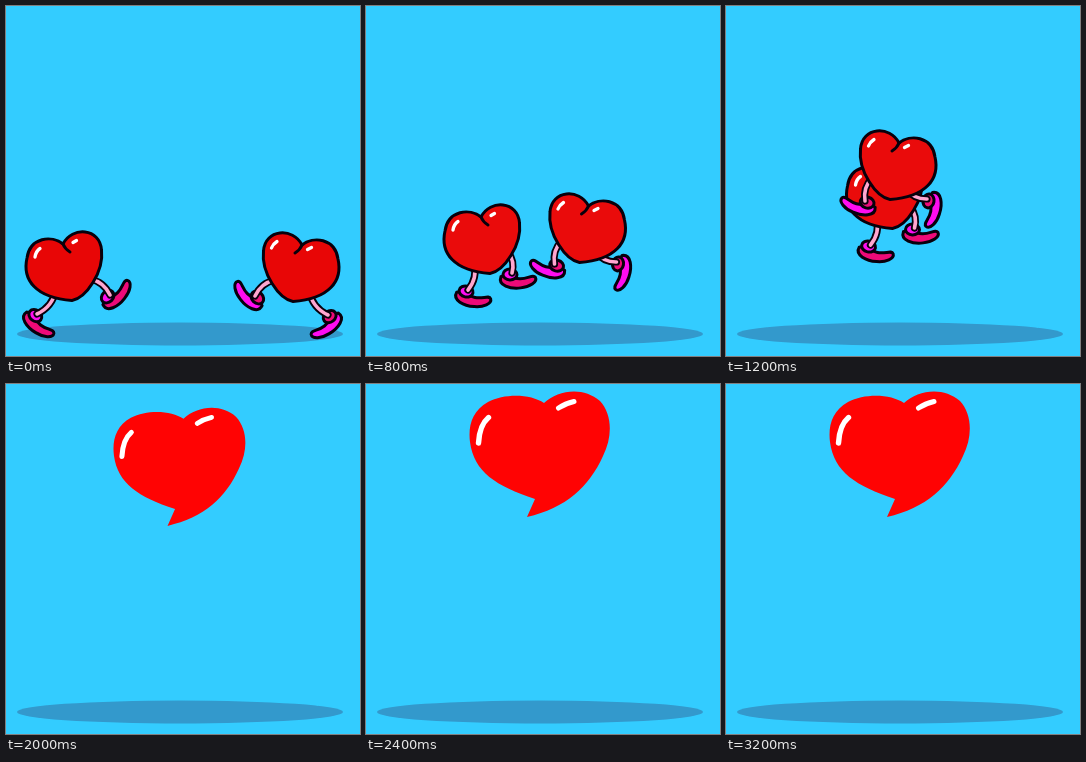
Recreate the animation shown at these times as an HTML page. Size 354 px wide and 350 px high, loop 3600 ms.

```html
<!DOCTYPE html>
<html lang="en">
<head>
<meta charset="utf-8">
<title>Two hearts become one</title>
<style>
html, body { margin: 0; width: 100%; height: 100%; overflow: hidden; background: #33ccff; }
svg { display: block; width: 354px; height: 350px; }
path, ellipse { stroke-linejoin: round; stroke-linecap: round; }
.line { stroke: #08000c; stroke-width: 3; }
.shine { stroke: #fff; }
</style>
</head>
<body>
<svg id="stage" viewBox="0 0 354 350">
  <ellipse cx="174" cy="328" rx="163" ry="11.5" fill="#3399cc"/>
</svg>
<script>
const STEP = 400, STEPS = 9, WALK_STEPS = 4, RISE_STEPS = 2;
const CRIMSON = '#ee0a78', MAGENTA = '#ff0cf0', PINK = '#ffa6cf', INK = '#08000c';
const REDS = ['#e80606', '#da0505', '#ea0b0b'];
const stage = document.getElementById('stage');

const BODY = 'M57 238C46 229 24 231 21 252C16 274 30 292 66 294.5C80 292 98 266 95.5 244C94 222 66 220 57 238Z';
const CREASE = 'M57 238Q59 243 64 246';
const SHOE = 'M-9 2C-12 11 1 14 11 12.5C20 11.5 28 6 25.5 1.5C23 -2 18 3.5 10 3.5C4 3.5 -4 -1 -9 2Z';
const BIG = 'M178 19C165 10 139 9 122 18C106 27 102 42 104 58C108 88 130 102 169 115L161 133' +
  'C200 124 223 103 237 72C247 52 246 30 234 17C217 2 192 6 178 19Z';

const HIPS = { back: [50, 284], front: [84, 273] };

// Each foot: x, y and tilt, beside a heart that faces right
const STRIDE = { back: [29, 310, 39], front: [102, 291, -44] };
const PLANT = { back: [42, 313, 12], front: [86, 296, 2] };
const KICK = { back: [27, 296, 80], front: [89, 298, -15] };

// The hearts start with a run and accelerate into the leap
const LEFT = {
  step: PLANT, shoe: CRIMSON, cuff: MAGENTA, frame: '',
  path: t => [20 * t + 4.5 * t * t, 7.5 * t - 10.5 * t * t],
  shines: ['M29 251Q30 245 34 242.5', 'M67 236.5L70.5 234.5']
};
const RIGHT = {
  step: KICK, shoe: MAGENTA, cuff: CRIMSON, frame: 'translate(353 1) scale(-1 1)',
  path: t => [28.25 * t + 4.25 * t * t, 9.5 * t - 14.5 * t * t],
  shines: ['M87.5 241Q86 237 82 234.5', 'M51.5 242.5L47.5 240.5']
};

function add(parent, tag, attrs) {
  const el = document.createElementNS('http://www.w3.org/2000/svg', tag);
  for (const k in attrs) el.setAttribute(k, attrs[k]);
  return parent.appendChild(el);
}

function stroke(parent, d, width, color) {
  add(parent, 'path', { d, fill: 'none', stroke: color, 'stroke-width': width });
}

function leg(parent, [hx, hy], [fx, fy, tilt], { shoe, cuff }) {
  const foot = add(parent, 'g', { transform: `translate(${fx} ${fy}) rotate(${tilt})` });
  add(foot, 'path', { d: SHOE, class: 'line', fill: shoe });
  add(foot, 'ellipse', { cy: -0.5, rx: 7, ry: 5.5, class: 'line', fill: cuff });

  // The knee bends to the side of the line from hip to ankle
  const ax = fx + 2, ay = fy - 2, dx = ax - hx, dy = ay - hy;
  const d = `M${hx} ${hy}Q${hx + dx / 2 + dy / 4} ${hy + dy / 2 - dx / 4} ${ax} ${ay}`;
  stroke(parent, d, 7.2, INK);
  stroke(parent, d, 3.6, PINK);
}

function walker(parent, who, t) {
  const side = add(parent, 'g', { transform: who.frame });
  const heart = add(side, 'g', { transform: `translate(${who.path(t)})` });
  const pose = t ? who.step : STRIDE;
  for (const end in HIPS) leg(heart, HIPS[end], pose[end], who);
  add(heart, 'path', { d: BODY, class: 'line', fill: REDS[Math.min(t, REDS.length - 1)] });
  add(heart, 'path', { d: CREASE, class: 'line', fill: 'none' });
  who.shines.forEach(d => stroke(heart, d, 3.3, '#fff'));
}

function walkScene(t) {
  const scene = add(stage, 'g', {});
  walker(scene, LEFT, t);
  walker(scene, RIGHT, t);
  return scene;
}

// Grows and climbs with an ease-out, then hangs still
function riseScene(t) {
  const left = (1 - Math.min(t / RISE_STEPS, 1)) ** 2;
  const size = 1 - 0.24 * left;
  const scene = add(stage, 'g', {
    transform: `translate(${103 + 16 * left} ${7 + 66 * left}) scale(${size}) translate(-103 -7)`
  });
  add(scene, 'path', { d: BIG, fill: '#ff0303' });
  stroke(scene, 'M112.5 59Q113.5 41 122.5 33.5', 5.4, '#fff');
  stroke(scene, 'M192.5 24Q199 19.5 208 17.5', 5, '#fff');
  return scene;
}

const scenes = Array.from({ length: STEPS }, (_, i) =>
  i < WALK_STEPS ? walkScene(i) : riseScene(i - WALK_STEPS));

function draw(t) {
  const now = Math.floor(t / STEP) % STEPS;
  scenes.forEach((s, i) => s.setAttribute('visibility', i === now ? 'visible' : 'hidden'));
}

const start = performance.now();
function tick() {
  draw(performance.now() - start);
  requestAnimationFrame(tick);
}
tick();
</script>
</body>
</html>
```
